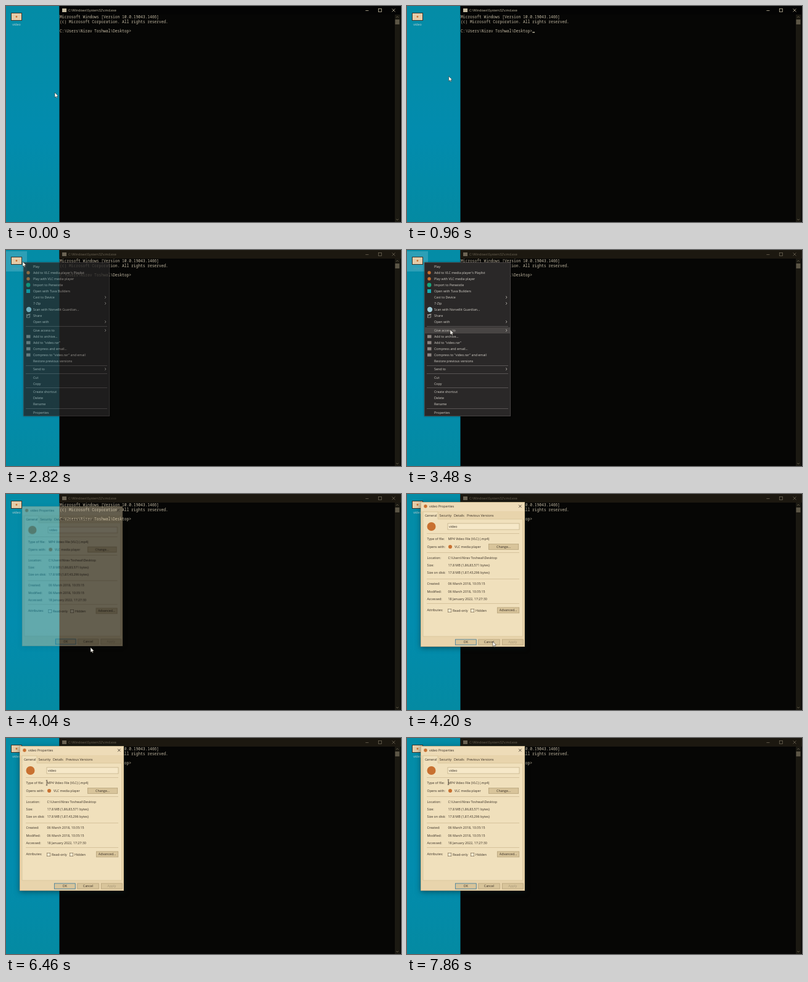
An HTML page with a canvas for the animation above (8000 ms loop, 640x352 px).

```html
<!DOCTYPE html>
<html lang="en">
<head>
<meta charset="utf-8">
<title>File properties</title>
<style>
  html, body { margin: 0; width: 100%; height: 100%; overflow: hidden; background: #000; }
  canvas { display: block; }
</style>
</head>
<body>
<canvas id="stage" width="640" height="352"></canvas>
<script>
const LOOP = 8000;
const UI = '5.3px "Open Sans", sans-serif';
const MONO = '6.24px "Noto Sans Mono", monospace';
const ORANGE = '#c87030';
const stage = document.getElementById('stage').getContext('2d');
let g = stage;

const clamp = v => Math.max(0, Math.min(1, v));
const ramp = (t, from, to) => clamp((t - from) / (to - from));
const ease = p => p * p * (3 - 2 * p);

function rect(x, y, w, h, fill) {
  g.fillStyle = fill;
  g.fillRect(x, y, w, h);
}
function frame(x, y, w, h, stroke, width = 0.6) {
  g.strokeStyle = stroke;
  g.lineWidth = width;
  g.strokeRect(x, y, w, h);
}
function dot(x, y, r, fill) {
  g.fillStyle = fill;
  g.beginPath();
  g.arc(x, y, r, 0, 7);
  g.fill();
}
function line(stroke, width, ...points) {
  g.strokeStyle = stroke;
  g.lineWidth = width;
  g.beginPath();
  points.forEach(([x, y]) => g.lineTo(x, y));
  g.stroke();
}
function text(str, x, y, fill, font = UI, align = 'left') {
  g.font = font;
  g.fillStyle = fill;
  g.textAlign = align;
  g.textBaseline = 'alphabetic';
  g.fillText(str, x, y + 1.9);
}
function layer(draw) {
  const canvas = document.createElement('canvas');
  canvas.width = 640;
  canvas.height = 352;
  g = canvas.getContext('2d');
  draw();
  g = stage;
  return canvas;
}

// Desktop and console

function desktop(selected) {
  const sky = g.createLinearGradient(0, 0, 0, 352);
  sky.addColorStop(0, '#048ca6');
  sky.addColorStop(0.6, '#028cae');
  sky.addColorStop(1, '#048aa2');
  rect(0, 0, 87, 352, sky);
  if (selected) rect(0, 2, 34, 33, 'rgba(130,200,215,.32)');
  rect(8, 11, 18, 13, '#38342c');
  rect(9, 12, 16, 11, '#e6cca8');
  dot(17, 17.5, 1.4, ORANGE);
  text('video', 17, 30, selected ? '#5c9cac' : '#c4d4d4', UI, 'center');
}

function consoleWindow(focused, caret) {
  const ink = focused ? '#c4baa0' : '#6c6454';
  const body = '#c2b8a2';
  rect(86.5, 0, 553.5, 352, '#060605');
  rect(86.5, 0, 553.5, 14, focused ? '#040404' : '#1c1810');
  rect(91, 4, 7, 6, ink);
  text('C:\\Windows\\System32\\cmd.exe', 101, 7, ink);
  line(ink, 0.8, [582.5, 7.5], [587.5, 7.5]);
  frame(603.5, 4.5, 5, 5, ink, 0.8);
  line(ink, 0.8, [625.5, 4.5], [630.5, 9.5]);
  line(ink, 0.8, [630.5, 4.5], [625.5, 9.5]);

  rect(630, 14, 8.5, 338, '#1b1912');
  rect(630.5, 22, 7, 8, '#5c5646');
  line('#6a6250', 0.8, [632, 19], [634, 17], [636, 19]);
  line('#6a6250', 0.8, [632, 347], [634, 349], [636, 347]);

  text('Microsoft Windows [Version 10.0.19043.1466]', 87, 18.3, body, MONO);
  text('(c) Microsoft Corporation. All rights reserved.', 87, 25.8, body, MONO);
  text('C:\\Users\\Nirav Toshwal\\Desktop>', 87, 40.6, body, MONO);
  if (caret) rect(203.2, 42.3, 3.8, 1.2, '#dcd4bc');
}

// Context menu: label, centre y, icon kind, has submenu

const menuRows = [
  ['Play', 27],
  ["Add to VLC media player's Playlist", 37, 'player'],
  ['Play with VLC media player', 47, 'player'],
  ['Import to Penwistle', 57, 'leaf'],
  ['Open with Tuva Builders', 67, 'editor'],
  ['Cast to Device', 77, '', true],
  ['7-Zip', 87, '', true],
  ['Scan with Norvellit Guardian...', 97, 'guard'],
  ['Share', 107, 'share'],
  ['Open with', 117, '', true],
  ['Give access to', 131, '', true],
  ['Add to archive...', 141, 'archive'],
  ['Add to "video.rar"', 151, 'archive'],
  ['Compress and email...', 161, 'archive'],
  ['Compress to "video.rar" and email', 171, 'archive'],
  ['Restore previous versions', 181],
  ['Send to', 194, '', true],
  ['Cut', 208], ['Copy', 218],
  ['Create shortcut', 231], ['Delete', 241], ['Rename', 251],
  ['Properties', 265]
];
const MENU_INK = '#d4d0c8';
const menuIcons = {
  player: y => dot(36, y, 2.7, ORANGE),
  leaf: y => dot(36, y, 3.4, '#18a67c'),
  editor: y => rect(33, y - 3, 6, 6, '#18a8b0'),
  guard: y => dot(37, y, 4.2, '#a0ccd8'),
  share: y => {
    frame(33.5, y - 1.5, 5, 4.5, MENU_INK);
    line(MENU_INK, 0.7, [35, y + 1], [36, y - 2], [39.5, y - 2.5]);
  },
  archive: y => rect(33, y - 2.5, 6.5, 5, '#8c8480')
};

const menu = layer(() => {
  rect(28, 20, 140, 251, '#2a2828');
  frame(28.3, 20.3, 139.4, 250.4, '#5a5454');
  [124, 188, 201, 224, 258].forEach(y => rect(32, y, 132, 0.7, '#6c6868'));
  for (const [label, y, icon, more] of menuRows) {
    if (icon) menuIcons[icon](y);
    text(label, 44, y, MENU_INK);
    if (more) line(MENU_INK, 0.7, [160, y - 2], [162, y], [160, y + 2]);
  }
});

// Properties dialog

const INK = '#3a3026';

function button(label, x, y, w, ink = INK, edge = '#b4a078') {
  rect(x, y, w, 9.5, '#d8c49a');
  frame(x + 0.3, y + 0.3, w - 0.6, 8.9, edge, 0.7);
  text(label, x + w / 2, y + 4.7, ink, UI, 'center');
}
function checkbox(label, x) {
  rect(x, 187, 6, 6, '#f8ecd0');
  frame(x + 0.3, 187.3, 5.4, 5.4, '#6c5c44');
  text(label, x + 8, 190, INK);
}

const dialog = layer(() => {
  rect(22, 13, 169, 236, '#e8d4ac');
  rect(22, 13, 169, 15, '#eedcb8');
  frame(22.3, 13.3, 168.4, 235.4, '#ac9870');
  dot(30, 20, 2.7, ORANGE);
  text('video Properties', 36, 20, INK);
  line(INK, 0.8, [181, 17.7], [185.5, 22.2]);
  line(INK, 0.8, [185.5, 17.7], [181, 22.2]);

  rect(26, 41, 161.5, 191, '#f0e0bc');
  frame(26, 41, 161.5, 191, '#d0bc92');
  rect(26, 29, 24, 13, '#f0e0bc');
  line('#d0bc92', 0.6, [26, 41], [26, 29], [50, 29], [50, 41]);
  text('General', 29, 35, INK);
  text('Security', 52.5, 35, INK);
  text('Details', 76, 35, INK);
  text('Previous Versions', 97, 35, INK);

  dot(39.5, 53, 7, ORANGE);
  rect(66, 48, 116, 10, '#f6e8c8');
  frame(66, 48, 116, 10, '#b4a078');
  text('video', 68, 53, INK);
  [64, 95, 138, 178].forEach(y => rect(32, y, 150, 0.7, '#ccb88e'));

  [
    ['Type of file:', 73, 'MP4 Video File (VLC) (.mp4)'],
    ['Opens with:', 86, ''],
    ['Location:', 104, 'C:\\Users\\Nirav Toshwal\\Desktop'],
    ['Size:', 116, '17.8 MB (1,86,83,571 bytes)'],
    ['Size on disk:', 128, '17.8 MB (1,87,43,296 bytes)'],
    ['Created:', 146.5, '06 March 2018, 10:35:15'],
    ['Modified:', 159, '06 March 2018, 10:35:15'],
    ['Accessed:', 171, '18 January 2022, 17:27:30'],
    ['Attributes:', 189.5, '']
  ].forEach(([label, y, value]) => {
    text(label, 32.5, y, INK);
    text(value, 66.5, y, INK);
  });
  dot(70, 86, 3, ORANGE);
  text('VLC media player', 77, 86, INK);
  button('Change...', 132, 81.3, 49);
  checkbox('Read-only', 66);
  checkbox('Hidden', 103);
  button('Advanced...', 146, 184.7, 36);
  button('OK', 78, 236.7, 34.5, INK, '#2070a0');
  button('Cancel', 115.5, 236.7, 35);
  button('Apply', 154, 236.7, 34.5, '#a89878');
});

// Pointer legs: start, end, x, y

const legs = [
  [720, 1520, 27, 19],
  [2900, 3240, 70, 130],
  [3480, 3860, 132, 264],
  [3900, 4040, 137, 250],
  [4060, 4220, 139, 240],
  [4320, 4780, 146, 160],
  [4800, 5060, 132, 126],
  [5160, 5900, 66, 73],
  [7700, 7700.1, 67, 72]
];
function pointerAt(t) {
  let x = 79, y = 141;
  for (const [from, to, nx, ny] of legs) {
    const p = ease(ramp(t, from, to));
    x += (nx - x) * p;
    y += (ny - y) * p;
  }
  return [x, y];
}
function drawPointer(x, y, beam) {
  if (beam) {
    line(INK, 0.8, [x, y - 4], [x, y + 4]);
    line(INK, 0.7, [x - 1.3, y - 4], [x + 1.3, y - 4]);
    line(INK, 0.7, [x - 1.3, y + 4], [x + 1.3, y + 4]);
    return;
  }
  const shape = [[0, 0], [0, 8], [1.9, 6.4], [3.1, 9], [4.3, 8.4], [3.2, 5.9], [5.6, 5.7]];
  g.beginPath();
  shape.forEach(([dx, dy]) => g.lineTo(x + dx, y + dy));
  g.closePath();
  g.fillStyle = '#fffcf4';
  g.strokeStyle = '#201c18';
  g.lineWidth = 0.5;
  g.fill();
  g.stroke();
}

function drawMenu(alpha, x, y) {
  g.save();
  g.globalAlpha = alpha;
  g.shadowColor = 'rgba(0,0,0,.4)';
  g.shadowBlur = 3;
  g.drawImage(menu, 0, 0);
  g.shadowColor = 'transparent';
  const row = menuRows.find(r => Math.abs(r[1] - y) <= 5);
  if (row && x > 28 && x < 168) rect(29, row[1] - 5, 138, 10, 'rgba(190,185,180,.2)');
  g.restore();
}

function drawDialog(p) {
  const size = 0.943 + 0.057 * p;
  g.save();
  g.globalAlpha = p;
  g.translate(106.5 + 1.6 * (1 - p), 131 + 5 * (1 - p));
  g.scale(size, size);
  g.translate(-106.5, -131);
  g.shadowColor = `rgba(0,25,30,${0.5 * p})`;
  g.shadowBlur = 8;
  g.shadowOffsetY = 2;
  g.drawImage(dialog, 0, 0);
  g.restore();
}

function render(now) {
  const t = now % LOOP;
  const [x, y] = pointerAt(t);
  const caret = (t >= 720 && t < 1130) || (t >= 1660 && t < 1960);
  const menuAlpha = ramp(t, 2680, 2880) * (1 - ramp(t, 3880, 3960));
  const opened = ramp(t, 3960, 4160);

  desktop(t > 1420 && t < 3960);
  consoleWindow(t < 1800, caret);
  if (menuAlpha) drawMenu(menuAlpha, x, y);
  if (opened) drawDialog(opened);
  drawPointer(x, y, opened === 1 && y < 178 && x > 64);
  requestAnimationFrame(() => render(performance.now()));
}
render(performance.now());
</script>
</body>
</html>
```
